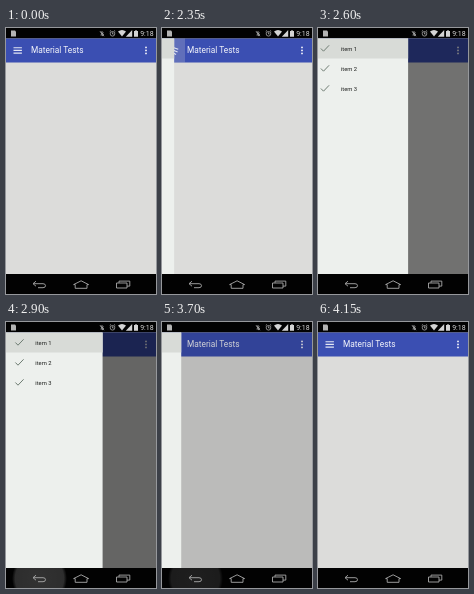
Recreate the animation shown at these times as an HTML page. Size 150 by 266 pixels, loop 5350 ms.

```html
<!DOCTYPE html>
<html lang="en">
<head>
<meta charset="utf-8">
<title>Navigation drawer</title>
<style>
html, body { margin: 0; width: 100%; height: 100%; overflow: hidden; background: #000; }
svg { display: block; width: 100vw; height: 100vh; }
text { font-family: Roboto, "Open Sans", sans-serif; }
.line { fill: none; stroke-linecap: butt; stroke-linejoin: round; }
</style>
</head>
<body>
<svg viewBox="0 0 150 266">
  <defs>
    <radialGradient id="glow">
      <stop offset="0" stop-color="#fff"/>
      <stop offset=".88" stop-color="#fff" stop-opacity=".9"/>
      <stop offset="1" stop-color="#fff" stop-opacity="0"/>
    </radialGradient>
    <clipPath id="navArea"><rect y="246" width="150" height="20"/></clipPath>
  </defs>
  <rect width="150" height="266" fill="#020202"/>

  <!-- status bar -->
  <g fill="#d4d4d4">
    <path d="M5 2.5h4l1 1v5H5z" fill="#b4b4b4"/>
    <path class="line" d="M94 3.2l4 5M96 3v5l1.800-1.500-3.300-2.200M94.500 7l3-2.500" stroke="#aaa" stroke-width=".8"/>
    <g class="line" stroke="#aaa" stroke-width=".8">
      <circle cx="106.500" cy="5.800" r="2.300"/>
      <path d="M106.500 4.300v1.700h1.200M103.700 3.600l1.300-1.200M109.300 3.600l-1.300-1.200"/>
    </g>
    <path d="M112 3.600q4-3 8 0l-4 5z"/>
    <path d="M126.200 2v6.700h-6.400z"/>
    <path d="M128 2.900h1.200V2.200h1.600v.7h1.200v5.900h-4z"/>
    <text x="134.200" y="8.400" font-size="7">9:18</text>
  </g>

  <!-- app -->
  <rect y="10.500" width="150" height="235.500" fill="#dcdcda"/>
  <rect y="10.500" width="150" height="24" fill="#3b4fb2"/>
  <rect id="press" y="10.500" width="23" height="24" fill="#c8cad0"/>
  <path id="menu" class="line" stroke="#e4e7f4" stroke-width="1.100"/>
  <text x="25" y="25.400" font-size="8.330" fill="#f4f5fb">Material Tests</text>
  <g fill="#eef0f8">
    <circle cx="140" cy="19.400" r=".95"/><circle cx="140" cy="22.400" r=".95"/><circle cx="140" cy="25.400" r=".95"/>
  </g>
  <rect id="scrim" y="10.500" width="150" height="235.500"/>
  <g id="drawer">
    <rect y="10.500" width="96.600" height="235.500" fill="#edf0ed"/>
    <rect y="10.500" width="96.600" height="20" fill="#d8dbd7"/>
    <g id="items"></g>
  </g>

  <!-- navigation bar -->
  <rect y="246" width="150" height="20" fill="#020202"/>
  <g clip-path="url(#navArea)"><circle id="ripple" cx="33.500" cy="256.500" r="27.500" fill="url(#glow)"/></g>
  <g class="line" stroke="#aaa" stroke-width=".9">
    <path d="M30 253.200l-3 2.500 3 2.500M27.300 255.700H37q2.500 0 2.500 2t-2.500 2h-5"/>
    <path d="M67.600 256.600l7.500-3.800 7.500 3.800H81v3.700H69.200v-3.700z"/>
    <path d="M110.500 255h10.500v5h-10.500zM113 254.800v-1.700h10.800v5H121"/>
  </g>
</svg>
<script>
const LOOP = 5350, STEP = 50, WIDTH = 96.6;
const SCRIM_LAG = 25;
const $ = id => document.getElementById(id);
const clamp = v => Math.min(1, Math.max(0, v));
const mix = (a, b, k) => a + (b - a) * k;
const progress = (t, start, length) => clamp((t - start) / length);
const settle = k => 1 - (1 - k) ** 5;
const openness = t => t < 3559
  ? settle(progress(t, 2333, 640))
  : 1 - settle(progress(t, 3559, 511));

$("items").innerHTML = [1, 2, 3].map((n, i) => `
  <g transform="translate(0 ${i * 20})">
    <path class="line" d="M9.400 20.500l2.600 2.700 5.600-5.900" stroke="#6f7d73" stroke-width="1"/>
    <text x="29.300" y="22.500" font-size="5.830" fill="#1c1e1c">item ${n}</text>
  </g>`).join("");

// Three bars that turn half a circle while folding into an arrow.
function menuPath(open) {
  const bar = (x1, y1, x2, y2) => `M${x1} ${y1}L${x2} ${y2}`;
  const side = s => bar(mix(-4.2, 4, open), s * mix(2.7, 0, open), mix(4.2, 0.6, open), s * mix(2.7, 3.4, open));
  return side(-1) + bar(-4.2, 0, 4.2, 0) + side(1);
}

function draw(t) {
  const open = openness(t);
  $("drawer").setAttribute("transform", `translate(${(open - 1) * WIDTH} 0)`);
  $("drawer").setAttribute("visibility", open > 0.002 ? "visible" : "hidden");
  $("scrim").setAttribute("opacity", openness(t - SCRIM_LAG) * 0.54);
  $("menu").setAttribute("d", menuPath(open));
  $("menu").setAttribute("transform", `translate(11.700 22.400) rotate(${open * 180})`);
  $("press").setAttribute("opacity", t < 100 ? 0 : 0.26 * (1 - progress(t, 2350, 200)));
  $("ripple").setAttribute("opacity", t < 2900 ? 0 : 0.19 * (1 - progress(t, 3600, 250)));
}

const begin = performance.now();
function frame() {
  const t = (performance.now() - begin) % LOOP;
  draw(Math.floor(t / STEP) * STEP);
  requestAnimationFrame(frame);
}
frame();
</script>
</body>
</html>
```
